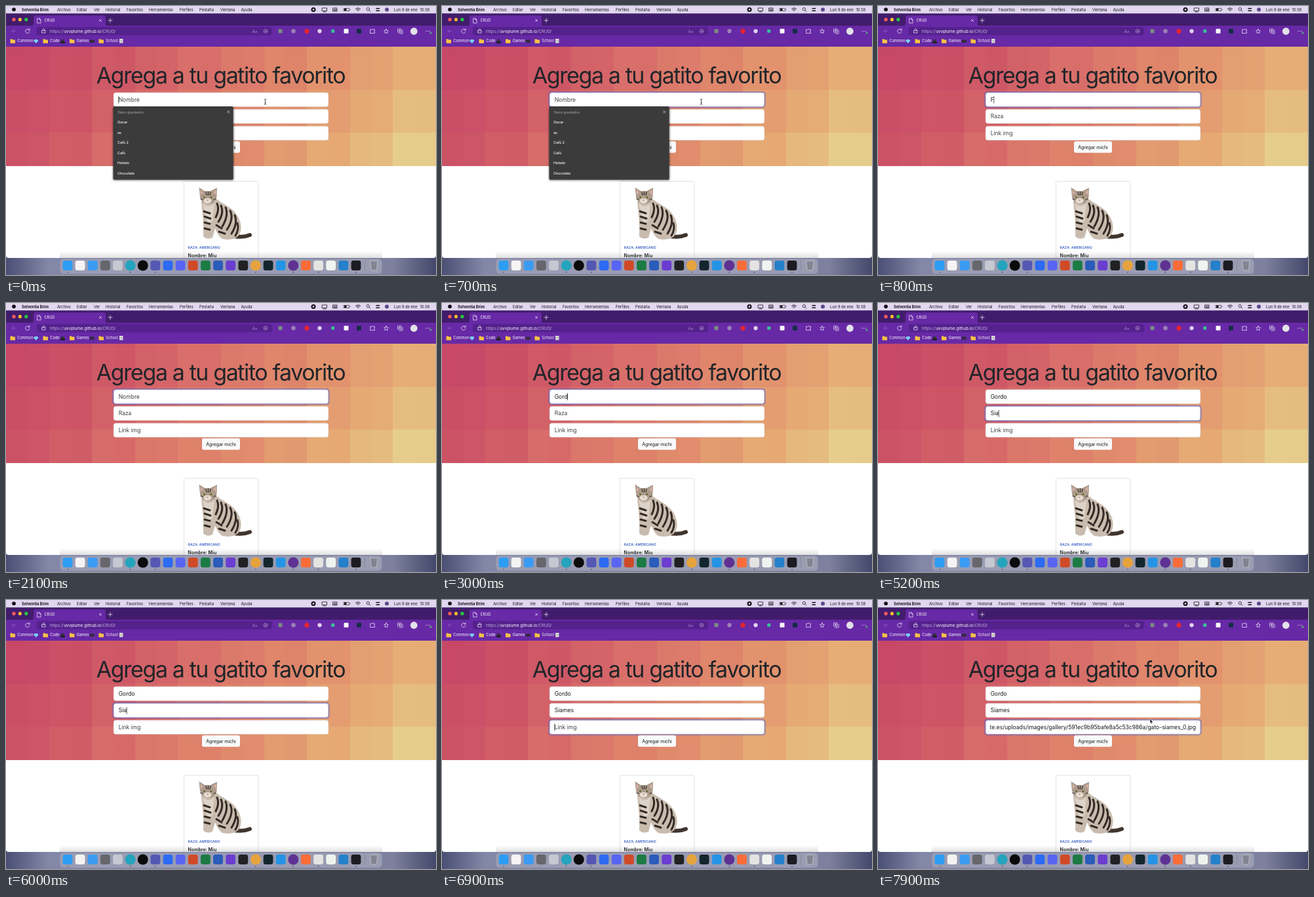
An HTML page that plays this animation: 656x410 px, repeating every 8000 ms.

```html
<!DOCTYPE html>
<html lang="es">
<head>
<meta charset="utf-8">
<title>CRUD</title>
<style>
  html, body { margin: 0; width: 100%; height: 100%; overflow: hidden; background: #4b4f70; }
  svg { display: block; width: 656px; height: 410px; font-family: Inter, sans-serif; font-optical-sizing: none; }
  text { white-space: pre; }
</style>
</head>
<body>
<svg id="stage" viewBox="0 0 656 410">
  <defs>
    <linearGradient id="wall"><stop stop-color="#4a4f74"/><stop offset=".1" stop-color="#8488a8"/><stop offset=".9" stop-color="#7d819e"/><stop offset="1" stop-color="#44486a"/></linearGradient>
    <linearGradient id="shade" x2="0" y2="1"><stop stop-opacity="0"/><stop offset="1" stop-opacity=".12"/></linearGradient>
    <filter id="soft"><feGaussianBlur stdDeviation="1.8"/></filter>
    <clipPath id="page"><path d="M0 62H656V380Q656 384 652 384H4Q0 384 0 380Z"/></clipPath>
    <clipPath id="inner"><rect x="171" y="130" width="315" height="76"/></clipPath>
  </defs>
  <rect width="656" height="410" fill="url(#wall)"/>
  <g id="chrome"></g>
  <g clip-path="url(#page)">
    <rect y="62" width="656" height="322" fill="#fff"/>
    <g id="hero" shape-rendering="crispEdges"></g>
    <text x="327.500" y="118" font-size="34" letter-spacing="-1.4" text-anchor="middle" fill="#212529">Agrega a tu gatito favorito</text>
    <g id="form"></g>
    <rect x="299" y="206.200" width="58" height="17.600" rx="2.8" fill="#f8f9fa"/>
    <text x="328" y="217.600" font-size="6.9" text-anchor="middle" fill="#111">Agregar michi</text>
    <rect x="271.4" y="267.2" width="113.4" height="150" rx="2" fill="#fff" stroke="#d5d5d5" stroke-width=".7"/>
    <g id="cat" stroke-linecap="round" fill="none">
      <path d="M344 350Q360 354 372 349" stroke="#3f352e" stroke-width="6"/>
      <path d="M298 297C299 313 302 326 301 351Q306 357 315 353L319 339Q323 350 330 355Q346 358 354 351C363 341 358 322 346 311C338 304 330 301 321 294Z" fill="#c9bcae"/>
      <path d="M300 300Q309 310 318 300L315 327L308 334Z" fill="#ddd3c8"/>
      <path d="M296 291L294.500 276.500L303 282H312L322 277L321.500 291Q319 302 308.500 302Q298 301 296 291Z" fill="#ab9b8c"/>
      <path d="M297 288L296.500 280L301 284ZM316 284L320.500 280V288Z" fill="#d8afa4"/>
      <ellipse cx="307.500" cy="297" rx="6" ry="4" fill="#e5dcd2"/>
      <path d="M306 295.500h3l-1.500 1.800z" fill="#b86f66"/>
      <g fill="#35321f" stroke="#a9a85f" stroke-width=".8"><circle cx="302.500" cy="291.500" r="1.500"/><circle cx="313" cy="291.500" r="1.500"/></g>
      <path d="M305 284l1 4M308.500 283.500v4.500M312 284l-1 4M297 294l3 1M320 294l-3 1" stroke="#3a312b" stroke-width="1.300"/>
      <path d="M322 301Q326 310 320 322M328 304Q333 315 324 329M335 307Q340 319 330 336M342 312Q348 324 337 341M349 319Q354 331 344 347M353 331Q356 340 350 350M302 313l9 3M303 321l9 3M303 330l8 2M303 339l8 2M321 334l8 5M325 344l9 3" stroke="#332b26" stroke-width="3"/>
    </g>
    <text x="277.600" y="370" font-size="5.2" font-weight="600" fill="#3b63c4">RAZA: AMERICANO</text>
    <text x="277.600" y="383.300" font-size="7" font-weight="600" fill="#222529">Nombre: Miu</text>
    <rect x="82" y="374" width="492" height="10" fill="url(#shade)"/>
  </g>
  <g id="menu"></g>
  <g id="dock"></g>
  <path id="beam" d="M-1.800-4Q0-4 0-3Q0-4 1.800-4M0-3V3M-1.800 4Q0 4 0 3Q0 4 1.800 4M-1 1H1" fill="none" stroke="#222" stroke-width=".75"/>
  <path id="arrow" d="M0 0V6.500L1.500 5.200L2.500 7.500L3.600 7L2.600 4.800H4.600Z" fill="#111" stroke="#fff" stroke-width=".5"/>
</svg>
<script>
const $ = id => document.getElementById(id);

function add(parent, tag, attrs, content) {
  const el = document.createElementNS('http://www.w3.org/2000/svg', tag);
  for (const key in attrs) el.setAttribute(key, attrs[key]);
  if (content !== undefined) el.textContent = content;
  return parent.appendChild(el);
}
const box = (p, x, y, width, height, fill, rx = 0) => add(p, 'rect', { x, y, width, height, fill, rx });
const dot = (p, cx, cy, r, fill) => add(p, 'circle', { cx, cy, r, fill });
const label = (p, x, y, size, fill, content, extra) =>
  add(p, 'text', { x, y, 'font-size': size, fill, ...extra }, content);
const line = (p, d, stroke = '#e6dcf2', width = .8) =>
  add(p, 'path', { d, stroke, 'stroke-width': width, fill: 'none', 'stroke-linecap': 'round', 'stroke-linejoin': 'round' });

function drawChrome(g) {
  // System menu bar
  const bar = '#e1d7ef', ink = '#17131c';
  box(g, 0, 0, 656, 11.5, bar);
  dot(g, 12, 5.3, 2.9, ink);
  label(g, 24, 7.5, 5.8, ink, 'Solventia Brim', { 'font-weight': 700 });
  const menus = { Archivo: 78, Editar: 108, Ver: 134, Historial: 152, Favoritos: 184, Herramientas: 218,
                  Perfiles: 265, Pestaña: 295, Ventana: 327, Ayuda: 358.5 };
  for (const name in menus) label(g, menus[name], 7.5, 5.8, ink, name);
  dot(g, 469, 5.5, 3.5, ink);
  box(g, 467.8, 4.3, 2.4, 2.4, bar);
  line(g, 'M482.500 3h7v4.500h-7zM484 9h4M499 3h6v5h-6zM500 5h4M500 6.500h4', ink, .8);
  line(g, 'M515.500 3.500h8v4h-8zM525 5v1', ink, .6);
  box(g, 516, 4, 3.5, 3, ink);
  line(g, 'M533.500 4.500Q537 1.500 540.500 4.500M535 6Q537 4.500 539 6M537 7.500v.2', ink, 1);
  line(g, 'M554.500 4.700a2.200 2.200 0 1 1-4.400 0a2.200 2.200 0 1 1 4.400 0M554 6.500l2 2', ink);
  line(g, 'M565 3.700h4.500M565 7.200h4.500', ink, 1.6);
  dot(g, 581, 5.5, 3, '#5a4a8c');
  label(g, 592, 7.5, 5.8, ink, 'Lun 9 de ene');
  label(g, 631.5, 7.5, 5.8, ink, '10:58');

  // Tabs
  box(g, 0, 11.5, 656, 19, '#421c6c');
  box(g, 0, 30, 656, 32, '#6729a6');
  add(g, 'path', { d: 'M40 30Q42 30 42 27V18Q42 14.500 45 14.500H149Q152 14.500 152 18V27Q152 30 154 30Z', fill: '#6729a6' });
  ['#ff5f57', '#febc2e', '#28c840'].forEach((c, i) => dot(g, 12 + i * 9.4, 20.7, 2.6, c));
  line(g, 'M48 19h3l2 2v5h-5zM51 19v2h2');
  label(g, 58.5, 24.2, 5.6, '#fff', 'CRUD');
  line(g, 'M142.500 20.500l3 3m0-3l-3 3M156 22h6m-3-3v6');

  // Toolbar
  box(g, 47, 32, 359, 12.5, '#54218d', 3);
  line(g, 'M15 38.300h-6m2.500-2.500l-2.500 2.500l2.500 2.500', '#8c60bb');
  line(g, 'M35.500 36.500a3.200 3.200 0 1 0 .500 2.500M36 34.500v2.300h-2.300');
  line(g, 'M55 37.500h5v3.500h-5zM56 37.500v-1.200a1.500 1.500 0 0 1 3 0v1.200');
  const url = label(g, 67, 40.6, 6.3, '#c4acdc', '');
  add(url, 'tspan', {}, 'https://');
  add(url, 'tspan', { fill: '#fff' }, 'uvvplume.github.io');
  add(url, 'tspan', {}, '/CRUD/');
  label(g, 375.5, 40.6, 6.3, '#a789c8', 'A»');
  line(g, 'M399 38.300a3 3 0 1 1-6 0a3 3 0 1 1 6 0M396 37v3M394.500 38.500h3', '#a789c8');
  box(g, 415.5, 35.3, 6, 6, '#7b8d7e', 1);
  dot(g, 438.5, 38.3, 3.2, '#9a83b4');
  dot(g, 459, 38.3, 3.6, '#e5252e');
  dot(g, 478.5, 38.3, 3.1, '#dfd3ee');
  box(g, 496.2, 35.8, 5, 5, '#35c49a', 1);
  box(g, 515.5, 34.8, 7, 7, '#f8f6fb', 1);
  box(g, 535, 34.8, 7, 7, '#132d45', 1);
  line(g, 'M556 36h2.500a1 1 0 0 1 2 0h2v2a1 1 0 0 0 0 2v1.500h-6.500z');
  line(g, 'M580 35l1 2.200l2.400.300l-1.800 1.600l.5 2.400l-2.100-1.200l-2.100 1.200l.5-2.400l-1.800-1.600l2.400-.300z');
  line(g, 'M598 35h5v5h-5zM600 42h5v-5M600.500 36.200v2.600m-1.300-1.300h2.600');
  dot(g, 622.3, 38.5, 5.4, '#e4e2e8');
  [641, 643.7, 646.4].forEach(x => dot(g, x, 38.3, .65, '#f0e8f8'));
  dot(g, 648, 41, 1.5, '#4cb575');

  // Bookmarks
  const folders = { Common: 6.5, Code: 56.5, Games: 97, School: 141.5 };
  for (const name in folders) {
    const x = folders[name];
    add(g, 'path', { d: `M${x} 50.500h3l1 1h3.500v5.200h-7.500z`, fill: '#f6c344' });
    label(g, x + 10.8, 55.2, 5.7, '#fff', name);
  }
  add(g, 'path', { d: 'M43.500 51h4.500l1.500 2l-3.700 4l-3.800-4z', fill: '#78cdf2' });
  box(g, 84, 50.5, 4.5, 4, '#35303a', 2);
  box(g, 82.800, 54, 7, 3, '#24202b', .5);
  box(g, 127.5, 51.5, 7.5, 4.2, '#302b36', 2);
  box(g, 173, 50, 5.500, 6.500, '#dedbd2', .5);
  line(g, 'M174.500 52.500h2.500M174.500 54h2.500', '#7c91ab', .5);
}

function drawHero(g) {
  const stops = [[200, 73, 104], [207, 88, 102], [219, 116, 106], [225, 141, 108], [230, 172, 116], [230, 213, 145]];
  const size = 65.6;
  for (let row = 0; row < 3; row++) for (let col = 0; col < 10; col++) {
    const pos = Math.min(.999, col * .09 + row * .075) * 5, k = Math.floor(pos);
    const rgb = stops[k].map((v, i) => Math.round(v + (stops[k + 1][i] - v) * (pos - k)));
    const x = col * size, y = 62 + row * size;
    const height = Math.min(size, 244 - y);
    box(g, x, y, size + .2, height, `rgb(${rgb})`);
    for (let q = 0; q < 2; q++) {
      const shade = ((col * 7 + row * 5 + q * 3) % 5 - 2) * .005;
      box(g, x + q * size / 2, y, size / 2, height, shade > 0 ? `rgba(255,230,190,${shade})` : `rgba(120,20,60,${-shade})`);
    }
  }
}

function drawDock(g) {
  box(g, 82.500, 385.500, 491, 22.500, '#9a9cb2', 5);
  // c: round icon, otherwise square
  const icons = ['#2d9df3', '#f5f3f4', '#3a9bf3', '#66666c', '#c6c8d2', 'c#25a4bd', 'c#0b0b0d', '#5458b3', '#2c6bf2',
    '#5865f2', '#d04a27', '#1c7b45', '#2a5cba', '#6b3dd1', '#212124', 'c#e6a33d', '#14262d', '#2594e6',
    'c#5e3193', '#fb6c38', '#e5e3e2', '#f1f3f0', '#2580cc', '#1d1b22'];
  icons.forEach((icon, i) => {
    const x = 94 + i * 19.13, color = icon.slice(-7);
    if (icon[0] === 'c') dot(g, x, 395.5, 8, color);
    else box(g, x - 7.4, 388.1, 14.8, 14.8, color, 3.4);
    if ([0, 5, 7, 15, 18, 20, 23].includes(i)) dot(g, x, 406, .7, '#2b2938');
  });
  line(g, 'M547.500 388v15', '#74768c', .5);
  add(g, 'path', { d: 'M555.500 388.500h11.500l-1.500 14.500h-8.500z', fill: '#8c8d98', stroke: '#c5c5ce', 'stroke-width': .7 });
  line(g, 'M558.500 390l.7 11M561.200 390v11M564 390l-.7 11', '#6b6c77', .6);
}

function drawMenu(g) {
  box(g, 163, 155, 184.5, 111, 'rgba(0,0,0,.45)', 2).setAttribute('filter', 'url(#soft)');
  box(g, 163.5, 153, 183.2, 111.8, '#3b3b3b', 2);
  label(g, 170.500, 163.600, 4.9, '#a9a9a9', 'Datos guardados');
  line(g, 'M337.500 159.700l3.500 3.500m0-3.500l-3.500 3.500', '#ddd', .7);
  ['Oscar', 'as', 'Café 2', 'Café', 'Helado', 'Chocolate'].forEach((item, i) =>
    label(g, 170, 179 + i * 15.5, 5.4, '#fff', item, { 'font-weight': 500 }));
}

// Each field: time it gains focus and the text it holds from given times on
const link = 'te.es/uploads/images/gallery/591ec9b95bafe8a5c53c986a/gato-siames_0.jpg';
const firstKey = 760;
const fields = [
  { hint: 'Nombre', focus: 0, blur: 3860,
    typing: [[firstKey, 'F'], [1400, ''], [2800, 'G'], [2900, 'Gor'], [3000, 'Gord'], [3100, 'Gordo']] },
  { hint: 'Raza', focus: 3860, blur: 6560,
    typing: [[4400, 'S'], [4800, 'Si'], [5000, 'Sia'], [6100, 'Siame'], [6300, 'Siames']] },
  { hint: 'Link img', focus: 6560, blur: 9000, typing: [[7300, link]] }
];

function drawField(field, i) {
  const y = 131.8 + i * 25.6, g = $('form');
  const frame = { x: 164.2, y: y + .2, width: 327.6, height: 21.4, rx: 3.4 };
  field.ring = box(g, 162.2, y - 1.8, 331.6, 25.4, 'rgba(60,80,200,.38)', 4.8);
  add(g, 'rect', { ...frame, fill: '#fff', stroke: '#ced4da', 'stroke-width': .45 });
  field.edge = add(g, 'rect', { ...frame, fill: 'none', stroke: '#8d93d6', 'stroke-width': .6 });
  const inner = add(g, 'g', { 'clip-path': 'url(#inner)' });
  field.text = label(inner, 171.7, y + 14, 8.53, '#212529', '');
  field.caret = box(inner, 0, y + 5.5, .7, 11, '#111');
}

const clamp = v => Math.max(0, Math.min(1, v));
const ease = v => v * v * (3 - 2 * v);
const show = (el, on) => el.setAttribute('visibility', on ? 'visible' : 'hidden');

function updateField(field, t) {
  const { text, caret, focus, blur } = field;
  const [since, value] = field.typing.filter(([at]) => at <= t).pop() || [focus, ''];
  const content = value || field.hint;
  if (text.textContent !== content) text.textContent = content;
  text.setAttribute('fill', value ? '#151719' : '#3c4045');
  const long = value === link;
  text.setAttribute('x', long ? 485 : 171.7);
  text.setAttribute('text-anchor', long ? 'end' : 'start');
  const glow = ease(clamp((t - focus) / 150)) - ease(clamp((t - blur) / 150));
  field.ring.setAttribute('opacity', glow);
  field.edge.setAttribute('opacity', glow);
  caret.setAttribute('x', long ? 485 : 171.5 + (value ? text.getComputedTextLength() : 0));
  show(caret, t >= focus && t < blur && (t - since) % 1000 < 500);
}

function render(t) {
  fields.forEach(field => updateField(field, t));
  show($('menu'), t < firstKey);
  const late = t >= 7800, move = clamp((t - 7800) / 100);
  const x = late ? 408 + 7 * move : 395.5, y = late ? 163 + 18.5 * move : 146;
  const arrow = late && move > .85;
  for (const id of ['beam', 'arrow']) $(id).setAttribute('transform', `translate(${x} ${y})`);
  show($('beam'), t < firstKey || late && !arrow);
  show($('arrow'), arrow);
}

drawChrome($('chrome'));
drawHero($('hero'));
drawDock($('dock'));
drawMenu($('menu'));
fields.forEach(drawField);

const start = performance.now();
function tick() {
  render((performance.now() - start) % 8000);
  requestAnimationFrame(tick);
}
tick();
</script>
</body>
</html>
```
